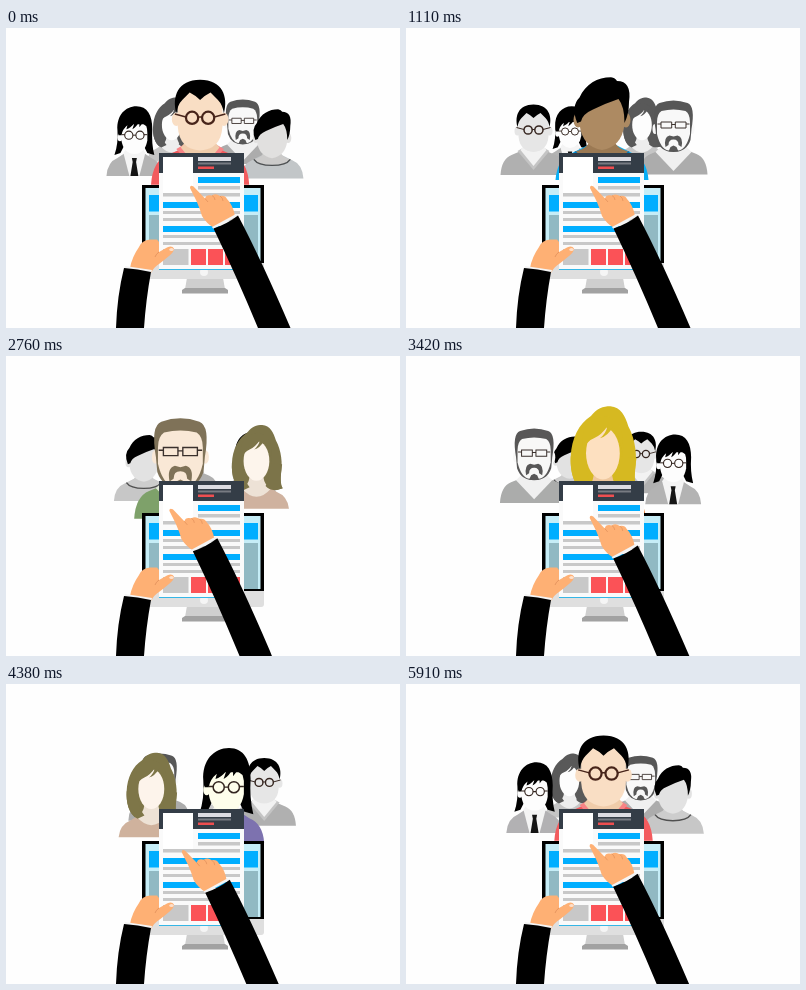
Write an HTML page with a canvas that moves like this. It is 394x300 px and loops after 6.27 s.

```html
<!DOCTYPE html>
<html lang="en">
<head>
<meta charset="utf-8">
<title>Choosing a candidate</title>
<style>
html, body { margin: 0; width: 100%; height: 100%; overflow: hidden; background: #fefefe; }
canvas { display: block; width: 394px; height: 300px; }
</style>
</head>
<body>
<canvas id="stage"></canvas>
<script>
const W = 394, H = 300;
const LOOP = 6270, LAST = 5910, TICK = 30, STEP = LOOP / 5;
const BLACK = '#000000', SKIN = '#feb074', CREASE = '#e08f5a';
const canvas = document.getElementById('stage');
const ctx = canvas.getContext('2d');
const dpr = window.devicePixelRatio || 1;
canvas.width = W * dpr;
canvas.height = H * dpr;

const lerp = (a, b, k) => a + (b - a) * k;

function mix(a, b, k) {
  const part = (hex, i) => parseInt(hex.slice(i, i + 2), 16);
  return 'rgb(' + [1, 3, 5].map(i => Math.round(lerp(part(a, i), part(b, i), k))).join() + ')';
}

function fill(d, color) {
  ctx.fillStyle = color;
  ctx.fill(new Path2D(d));
}

function line(d, color, width) {
  ctx.strokeStyle = color;
  ctx.lineWidth = width;
  ctx.stroke(new Path2D(d));
}

function rect(x, y, x2, y2, color) {
  ctx.fillStyle = color;
  ctx.fillRect(x, y, x2 - x, y2 - y);
}

function oval(x, y, rx, ry, color) {
  ctx.fillStyle = color;
  ctx.beginPath();
  ctx.ellipse(x, y, rx, ry, 0, 0, 7);
  ctx.fill();
}

function ring(x, y, r, color, width) {
  ctx.strokeStyle = color;
  ctx.lineWidth = width;
  ctx.beginPath();
  ctx.arc(x, y, r, 0, 7);
  ctx.stroke();
}

function body(w, top, base, color) {
  fill(`M${-w} ${base}Q${1 - w} ${top + 8} ${11 - w} ${top + 4}L-8 ${top - 2}H8` +
       `L${w - 11} ${top + 4}Q${w - 1} ${top + 8} ${w} ${base}Z`, color);
}

// Each figure is drawn around its eye line; k runs from grey (0) to full colour (1).
function roundGlassesMan(k) {
  const skin = mix('#e6e6e6', '#f9dec3', k);
  body(33, 21, 45, mix('#b0b0b0', '#f4595c', k));
  fill('M-16 21L-9 17H9L16 21L0 40Z', mix('#c4c4c4', '#f98284', k));
  fill('M-13 20L-8 14H8L13 20L0 36Z', mix('#f2f2f2', '#f0cba9', k));
  oval(-16, 1, 3, 4.5, skin);
  oval(16, 1, 3, 4.5, skin);
  fill('M-15 -8Q-15 -20 0 -20T15 -8V6Q14 21 0 22Q-14 21 -15 6Z', skin);
  fill('M-16 -3C-19 -14 -15 -25.5 0 -25.5S19 -14 16 -3Q15 -9 12 -12L7 -17Q3 -15 0 -12Q-3 -15 -7 -17L-12 -12Q-15 -9 -16 -3Z', BLACK);
  const frame = mix('#35251f', '#47241a', k);
  ring(-5.4, 0, 4.1, frame, 1.5);
  ring(5.4, 0, 4.1, frame, 1.5);
  line('M-1.5 -.5H1.5M-9.5 -.5L-17 -2.5M9.5 -.5L17 -2.5', frame, 1);
}

function tieGirl(k) {
  const skin = mix('#fdfdfd', '#ffffe3', k);
  body(28, 19, 41, mix('#b3b3b3', '#6757ae', k));
  fill('M-11 18L-6 10H6L11 18L5 41H-5Z', mix('#f4f4f4', '#f5f3e6', k));
  fill('M-2.5 23H2.5L1.7 27L4 41H-4L-1.7 27Z', '#151515');
  fill('M-17 -5C-18 -20 -9 -29 2 -29S18 -20 18 -6Q17 8 20 20L13 18L9 10H-10L-14 18L-20 20Q-16 8 -17 -5Z', BLACK);
  oval(-14.5, 2, 2.5, 4, skin);
  fill('M-13 -11H13V5Q11 18 0 19Q-11 18 -13 5Z', skin);
  fill('M-16 0C-18 -18 -10 -23 1 -23S17 -17 15 3L12 -9L8 -12L5 -8L5 -14Q2 -8 -2 -6L0 -12Q-4 -7 -8 -6L-7 -10Q-12 -6 -13 0Z', BLACK);
  ring(-5.6, 0, 4.1, '#33251f', 1.1);
  ring(5.6, 0, 4.1, '#33251f', 1.1);
  line('M-1.5 0H1.5M-9.5 -.5H-13M9.5 -.5H13', '#33251f', 1);
}

function longHairWoman(k) {
  const hair = mix('#595959', '#d7ba20', k);
  const skin = mix('#fdfdfd', '#fde0bf', k);
  fill('M-12 26C-20 22 -22 11 -21.5 2C-21 -10 -16 -20 -8 -25C-4 -30 0 -31.5 5 -31.5C12 -31 15 -25 17 -18C22 -9 23 3 21.5 11Q20 20 23 24Q14 28 0 24Z', hair);
  body(28.5, 23, 42, mix('#c5c5c5', '#e8833f', k));
  fill('M-13 24Q-7 22 -6 14H6Q7 22 13 24Q0 39 -13 24Z', mix('#ededed', '#eec79c', k));
  fill('M-12 26C-20 22 -22 11 -21.5 2L-11 3Q-12 17 -6 23ZM11 2L22.5 3Q20 20 23 24Q13 28 8 22Q12 16 11 2Z', hair);
  oval(0, 0, 11.3, 17.5, skin);
  fill('M-13 -2Q-17 -23 2 -25Q16 -22 13 3Q12 -11 7 -18Q3 -11 -2 -10Q2 -13 3 -18Q-1 -12 -6 -10Q-11 -8 -13 -2Z', hair);
}

function beardedMan(k) {
  const hair = mix('#575757', '#8e7c59', k);
  const skin = mix('#f8f8f8', '#fae2c8', k);
  body(34, 25, 49.5, mix('#acacac', '#6c9c50', k));
  fill('M-18 27L-9 18H9L18 27L0 46Z', mix('#f0f0f0', '#dfe7cf', k));
  oval(-18.5, 4, 2.5, 5, skin);
  oval(18.5, 4, 2.5, 5, skin);
  fill('M-18 4Q-22 -19 -14 -22Q0 -27 14 -22Q22 -19 18 4L17 15Q13 27 0 27T-17 15Z', hair);
  fill('M-16.5 -3Q-16.5 -11 -12 -14Q0 -17 12 -14Q16.5 -11 16.5 -3L16.5 9Q13 24 5 25.5H-5Q-13 24 -16.5 9Z', skin);
  fill('M-8 22Q-10 12 -4 10.5L0 11.5L4 10.5Q10 12 8 22L5 20Q5 14.5 0 14.5T-5 20Z', hair);
  fill('M-3 22L0 20.5L3 22L5 26.5H-5Z', hair);
  line('M-12.5 -3H-1.8V3H-12.5ZM1.8 -3H12.5V3H1.8ZM-1.8 -.5H1.8M-12.5 -1H-16M12.5 -1H16', '#3a302c', 1);
}

function quiffMan(k) {
  const skin = mix('#e2e2e2', '#ad8a62', k);
  body(31, 22, 44, mix('#c7c7c7', '#08aef5', k));
  fill('M-18 25Q-8 23 -7 14H7Q8 23 18 25Q14 31 0 31T-18 25Z', mix('#cdcdcd', '#9b7953', k));
  line('M-18 25Q-14 31 0 31T18 25', mix('#505050', '#087bb8', k), 1.4);
  oval(-16, 4, 3, 5, skin);
  oval(16, 4, 3, 5, skin);
  fill('M-15 -9Q0 -18 15 -9V7Q13 22 0 24Q-13 22 -15 7Z', skin);
  fill('M-16.5 6Q-21 -5 -15 -11C-11 -20 -3 -24.5 6 -24.5Q9 -24 10 -22Q20 -22 18 -8Q18 0 15 6Q15 -5 11 -10Q2 -7 -6 -3Q-13 0 -14 5Z', BLACK);
}

const people = [
  { draw: roundGlassesMan, side: 102, front: 89 },
  { draw: tieGirl, side: 107.5, front: 94 },
  { draw: longHairWoman, side: 101, front: 97 },
  { draw: beardedMan, side: 97, front: 88 },
  { draw: quiffMan, side: 106, front: 86 }
];

// Slots in travelling order: front, left, back left, back right, right.
const slotX = [196, 127.5, 164, 236, 267.5];
const slotSize = [1.5, 1, 0.87, 0.87, 1];

function slotY(person, slot) {
  if (slot === 0) return person.front;
  return slotSize[slot] < 1 ? person.side - 4 : person.side;
}

// Steady travel with a short soft start and stop.
function glide(x) {
  const q = 0.188, v = 1 / (1 - q);
  if (x >= 1) return 1;
  if (x < q) return v * x * x / (2 * q);
  if (x > 1 - q) return 1 - v * (1 - x) ** 2 / (2 * q);
  return v * (x - q / 2);
}

function drawPeople(t) {
  const turn = t / STEP + 0.073;
  const n = Math.floor(turn);
  const p = glide((turn - n) / 0.849);
  const arc = Math.sin(Math.PI * p);
  people.map((person, i) => {
    const a = (i + n) % 5, b = (a + 1) % 5;
    const bendX = a === 0 ? -3 : b === 0 ? 4 : 0;
    const bendY = bendX ? 6.5 : a === 2 ? 0 : -3;
    return {
      draw: person.draw,
      x: lerp(slotX[a], slotX[b], p) + bendX * arc,
      y: lerp(slotY(person, a), slotY(person, b), p) + bendY * arc,
      size: lerp(slotSize[a], slotSize[b], p),
      k: a === 0 ? 1 - p : b === 0 ? p : 0
    };
  }).sort((a, b) => a.size - b.size).forEach(f => {
    ctx.save();
    ctx.translate(f.x, f.y);
    ctx.scale(f.size, f.size);
    f.draw(f.k);
    ctx.restore();
  });
}

function drawMonitor() {
  fill('M181 250H217L219 261H179Z', '#cfcfcf');
  fill('M179 260H219L222 262V265.5H176V262Z', '#a2a2a2');
  fill('M136 234H258V248Q258 251 255 251H139Q136 251 136 248Z', '#dfdfdf');
  rect(136, 157, 258, 235, BLACK);
  rect(139.5, 160, 254.5, 233, '#c6edf7');
  for (const [x, x2] of [[143, 160], [232, 252]]) {
    rect(x, 167, x2, 183.5, '#00aeff');
    rect(x, 187, x2, 233, '#91b9c3');
  }
  oval(198, 244, 4, 4, '#f5f5f5');
}

function drawResume() {
  const blue = '#00aeff', gray = '#c8c8c8', red = '#fb5257';
  rect(153, 125, 238, 242, '#fafafa');
  rect(153, 241, 238, 242, '#35b6e6');
  rect(153, 125, 238, 145, '#343d47');
  rect(157, 129, 187, 165, '#ffffff');
  rect(192, 129, 225, 133, '#dcdce2');
  rect(192, 134.5, 225, 136.5, '#777b82');
  rect(192, 138.5, 208, 141, '#ed4e50');
  rect(192, 149, 234, 155, blue);
  rect(192, 158, 234, 161.5, gray);
  rect(157, 165, 234, 168.5, gray);
  for (const y of [174, 198]) {
    rect(157, y, 234, y + 6, blue);
    rect(157, y + 9, 234, y + 12, gray);
    rect(157, y + 16, 234, y + 19, gray);
  }
  rect(157, 221, 182.5, 237, gray);
  for (const x of [185, 202, 219]) rect(x, 221, x + 15, 237, red);
}

function drawLeftHand() {
  fill('M124 240Q126 229 133 219Q136 212 144 211.5H151L153 214V224L161 219.5Q166 217 168 220.5Q168 224 163 228Q157 233 153 236Q148 239 145 245Z', SKIN);
  line('M153 224Q150 226 149 229', CREASE, 0.8);
  oval(165.5, 221.5, 2.2, 1.6, '#fde0cc');
  fill('M119 238L146 242L145 245L118 241Z', '#f4f4f4');
  fill('M118 240Q132 241 145 244Q140 271 138 300H110Q111 268 118 240Z', BLACK);
}

function drawRightHand(t) {
  const u = (t / STEP) % 1;
  const rest = Math.max(0, 1 - u / 0.9);
  const a = 2 * Math.PI * (1 - rest * rest);
  ctx.save();
  ctx.translate(11.5 * Math.cos(a) - 11.5, -8.5 * Math.sin(a));
  fill('M184 160Q184 156.5 187.5 158.5L199 170.5Q200 166 206 167.5Q210 165 214 168Q219 167 221 171Q227 177 229 188L208 200Q200 195 196 188Q194 181 190.5 173Z', SKIN);
  line('M199 170.5L202 174M206 167.5Q209 169 209 172M214 168Q217 170 217 173', CREASE, 0.7);
  fill('M206 199L230 186L231.5 188L207.5 201Z', '#f4f4f4');
  fill('M207.5 200.5Q221 196 232 187.5Q255 231 284.5 300L293 321H261L252 300Q230 247 207.5 200.5Z', BLACK);
  ctx.restore();
}

function render(t) {
  ctx.setTransform(dpr, 0, 0, dpr, 0, 0);
  rect(0, 0, W, H, '#fefefe');
  drawPeople(t);
  drawMonitor();
  drawResume();
  drawLeftHand();
  drawRightHand(t);
}

const start = performance.now();
function tick(now) {
  const t = Math.max(0, now - start) % LOOP;
  render(Math.min(LAST, Math.floor(t / TICK) * TICK));
  requestAnimationFrame(tick);
}
render(0);
requestAnimationFrame(tick);
</script>
</body>
</html>
```
